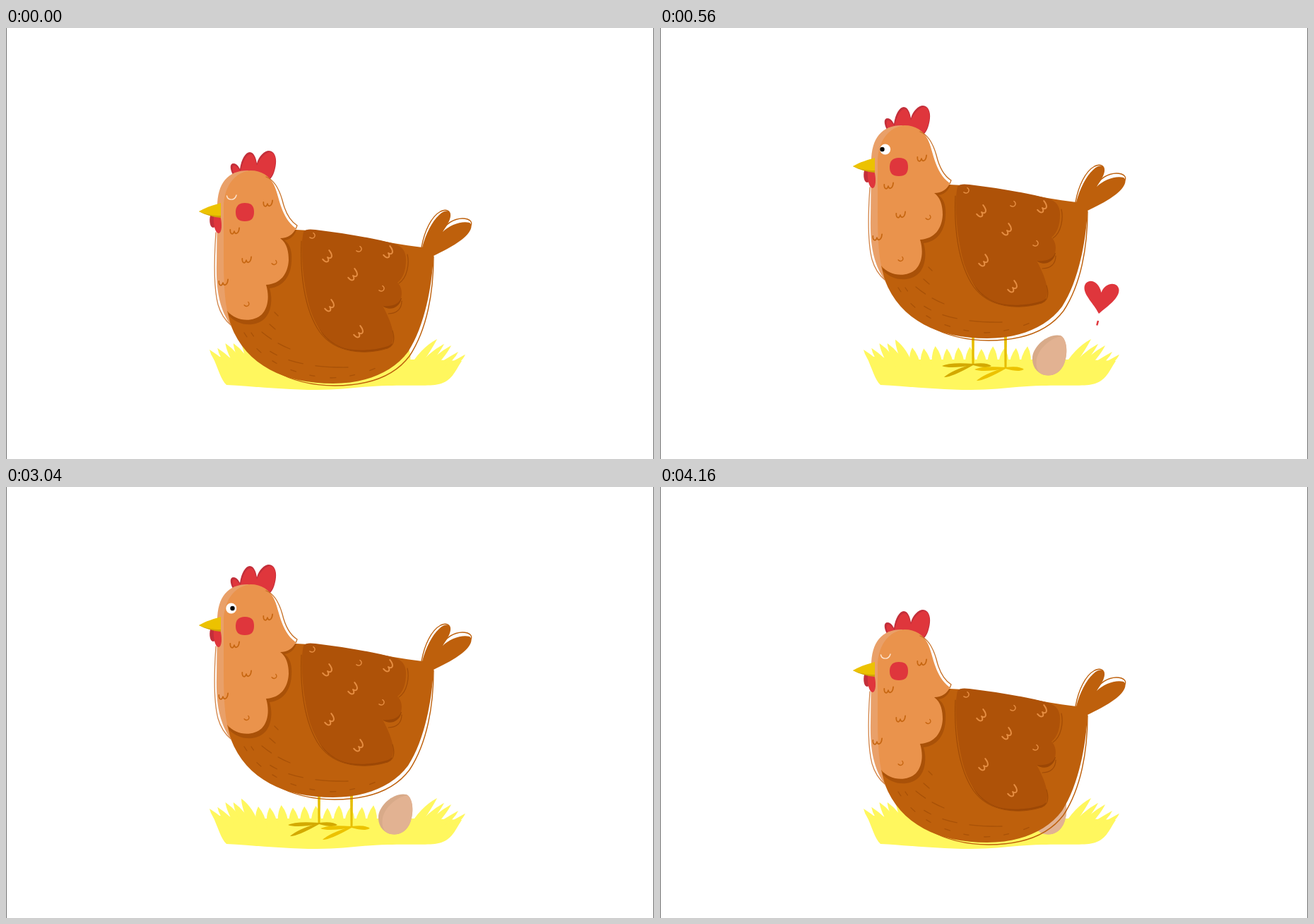
These frames come from a looping animation (917x611 px, 4320 ms). An HTML page:

```html
<!DOCTYPE html>
<html lang="en">
<head>
<meta charset="utf-8">
<title>Hen and egg</title>
<style>
html, body { margin: 0; width: 100%; height: 100%; overflow: hidden; background: #fff; }
svg { display: block; width: 100%; height: 100%; }
.line { fill: none; stroke-linecap: round; stroke-linejoin: round; }
</style>
</head>
<body>
<svg viewBox="0 0 917 611">
  <path d="M.5 0V611M916.5 0V611" stroke="#707070"/>
  <g id="grass" fill="#fff75e">
    <path d="M292 465C300 482 304 499 312 506C350 508 395 513 440 513C480 513 500 508 540 507C575 506 600 508 612 505C631 501 635 487 645 472L600 470H345Z"/>
  </g>
  <g id="feet"></g>

  <g id="egg">
    <path fill="#d8aa89" d="M567 436C576 441 578 462 571 478C565 490 555 494 544 492C532 489 526 478 527 466C529 450 550 432 567 436Z"/>
    <path fill="#e2b292" d="M568 437C576 442 578 462 571 478C565 490 555 494 544 492C535 490 531 482 533 469C536 455 551 440 568 437Z"/>
  </g>

  <g id="hen">
    <path fill="#be600c" d="M380 222H410C480 225 530 240 589 247C594 228 603 210 613 201C620 194 628 194 629 200C630 207 624 216 618 225C628 215 645 209 656 212C662 216 657 227 645 236C632 246 617 253 605 259C603 300 593 358 569 395C546 426 506 440 463 440C395 440 340 415 318 357L304 325Z"/>
    <g class="line" stroke="#be600c" stroke-width="1.4">
      <path d="M588 247C592 224 602 203 615 196C621 193 627 194 628 199M622 217C630 208 643 204 653 207C658 209 660 212 658 216"/>
      <path d="M605 260C605 310 596 363 571 401C547 433 507 443 465 443C432 443 403 435 380 422"/>
    </g>
    <g class="line" stroke="#a85107" stroke-width="1.3">
      <path stroke-dasharray="7 22 8 20" d="M337 368C360 405 400 428 460 432Q500 430 530 415"/>
      <path stroke-dasharray="6 32 11 18 21 18 50" d="M347 368C367 400 410 418 484 417"/>
      <path stroke-dasharray="17 11 21" d="M362 367Q380 382 402 391"/>
      <path d="M373 356l8 7M380 339l5 5"/>
    </g>

    <path fill="#9c4705" d="M420 250C419 290 428 340 448 370C468 396 508 400 540 390C546 388 547 384 545 380ZM533 330C541 337 556 335 560 319L548 316Z"/>
    <path fill="#ae5208" d="M421 225C424 221 430 221 438 222C480 227 520 234 550 242C562 246 566 254 566 264C566 280 562 290 554 297C560 303 561 311 559 319C556 328 546 331 533 330C541 345 548 360 548 374C548 383 545 386 537 388C520 393 500 394 484 391C460 386 442 367 432 339C422 311 415 250 421 225Z"/>
    <path class="line" stroke="#a14b06" stroke-width="1.2" d="M418 238C416 280 421 334 444 367C466 397 507 400 540 390C550 386 550 375 547 365M541 341C552 341 560 335 560 323M556 298C568 290 571 270 568 257"/>
    <g id="wingMarks" class="line" stroke="#e58d42" stroke-width="1.7"></g>

    <path fill="#a95108" d="M411 222C408 231 402 236 394 237C403 243 405 255 404 267C403 288 392 303 373 305C378 321 375 339 366 348C351 362 326 357 315 343L330 300L380 230Z"/>
    <path fill="#c32f3a" d="M321 144C317 136 316 128 322 128C327 128 330 134 331 136C333 122 339 112 345 112C351 112 354 121 355 128C358 117 366 110 372 110C380 110 383 120 382 128C381 138 378 146 374 150L340 155Z"/>
    <path fill="#df363c" d="M323 144C320 137 320 131 323 131C327 132 329 136 332 139C335 125 340 115 346 115C351 115 353 123 355 131C359 120 368 112 374 112C381 113 382 121 381 129C380 138 377 145 373 149L340 155Z"/>
    <path fill="#e9a069" d="M299 190C299 156 314 138 342 138L355 142L313 337L318 357C303 336 297 310 298 270Z"/>
    <path fill="#ea934c" d="M346 138C362 138 373 146 379 158C387 174 388 204 410 220C407 228 399 234 388 234C398 241 400 254 400 265C399 285 388 299 368 300C373 316 371 333 362 342C349 354 325 352 313 337C308 312 308 280 308 250V190C308 162 323 140 346 138Z"/>
    <g class="line" stroke-width="1.3">
      <path stroke="#d28448" d="M297 226C294 270 294 305 300 328C304 342 311 351 318 357"/>
      <path stroke="#c66f24" d="M368 147C381 152 387 166 391 180C395 197 401 209 412 216L410 221"/>
    </g>
    <g id="headMarks" class="line" stroke="#c66611" stroke-width="1.7"></g>

    <path fill="#c32f3a" d="M289 202C287 210 289 219 293 219C297 219 298 211 298 202Z"/>
    <path fill="#df363c" d="M294 202C293 215 296 227 301 227C306 226 306 212 303 202Z"/>
    <path fill="#d0a604" d="M273 196L304 193V205C293 204 282 201 273 196Z"/>
    <path fill="#ecc200" d="M273 196C283 190 294 187 304 184V202C293 202 282 200 273 196Z"/>
    <path fill="#df363c" d="M338 184C348 184 351 189 351 197C351 206 347 210 338 210C329 210 325 206 325 197C325 189 329 184 338 184Z"/>
    <path id="lid" class="line" stroke="#fde6d2" stroke-width="1.4" d="M312.5 174C314 181 324 181 326 173"/>
    <g id="eye">
      <circle cx="318.7" cy="172" r="7.5" fill="#fff"/>
      <circle id="pupil" cy="172" r="3.2"/>
    </g>
  </g>

  <g id="heart">
    <path fill="#df363c" d="M621 405C614 391 600 379 600.5 368C601 355 620 354 624.5 375C630 360 648 359 649.5 371C650 383 634 394 621 405Z"/>
    <path stroke="#df363c" stroke-width="2.5" d="M620 415L618.3 421.5"/>
  </g>
</svg>
<script>
const $ = id => document.getElementById(id);
const add = (id, d, attrs = '') =>
  $(id).insertAdjacentHTML('beforeend', `<path d="${d}" ${attrs}/>`);

// A row of blades between two end blades, each leaning from its root to its tip
function blades(count, from, to) {
  for (let i = 0; i < count; i++) {
    const mix = key => from[key] + (to[key] - from[key]) * i / (count - 1);
    const x = mix('x'), y = mix('y') + 2 * Math.sin(i * 2.4), root = mix('root');
    const mx = x + (root - x) * .45, my = y + 13;
    add('grass', `M${root - 7} 484Q${mx - 9} ${my} ${x} ${y}Q${mx + 9} ${my} ${root + 7} 484Z`);
  }
}
blades(5, { x: 288, y: 456, root: 314 }, { x: 333, y: 442, root: 353 });
blades(14, { x: 357, y: 453, root: 362 }, { x: 569, y: 453, root: 563 });
blades(5, { x: 610, y: 441, root: 576 }, { x: 650, y: 463, root: 618 });

// A leg with three toes that widen towards the tip
function foot(x, y, color) {
  add('feet', `M${x - 2} 430H${x + 2}L${x + 1.5} ${y + 1}H${x - 1.5}Z`, 'fill="#e6bd02"');
  for (const [dx, dy] of [[-44, 2], [-41, 18], [26, 2]]) {
    const cx = x + dx * .75, cy = y + dy * .75;
    add('feet', `M${x} ${y - 1}Q${cx} ${cy - 5} ${x + dx} ${y + dy}Q${cx} ${cy + 5} ${x} ${y + 1}Z`, `fill="${color}"`);
  }
}
foot(443, 477, '#d3a900');
foot(489, 482, '#ecc200');

// Feather marks: one shape repeated at a few points
const double = 'M-6-1C-5 6 0 6 0 0C2 5 7 3 6-6';
const single = 'M-4 3C3 6 6-3 0-5';
const marks = (id, d, angle, size, points) => points.forEach(([x, y]) =>
  add(id, d, `transform="translate(${x} ${y}) rotate(${angle}) scale(${size})"`));
marks('headMarks', double, 12, 1, [[370, 185], [323, 224], [340, 265], [307, 297]]);
marks('headMarks', single, 25, .8, [[380, 269], [341, 328]]);
marks('wingMarks', double, -32, 1.2, [[455, 261], [541, 255], [491, 287], [458, 331], [499, 368]]);
marks('wingMarks', single, 12, .9, [[500, 250], [532, 306], [434, 231]]);

const ramp = (t, from, to) => Math.min(1, Math.max(0, (t - from) / (to - from)));
const ease = p => (1 - Math.cos(Math.PI * p)) / 2;
const scaleAt = (x, y, sx, sy) =>
  `translate(${x} ${y}) scale(${sx} ${sy}) translate(${-x} ${-y})`;
const show = (id, on) => $(id).setAttribute('visibility', on ? 'visible' : 'hidden');
const move = (id, value) => $(id).setAttribute('transform', value);

function draw(now) {
  const t = Math.floor(now % 4320 / 40) * 40;

  const stand = ease(ramp(t, 0, 176)) - ease(ramp(t, 3780, 3980));
  move('hen', `translate(0 ${64 * (1 - stand)})`);

  const open = ramp(t, 200, 320) - ramp(t, 4000, 4120);
  show('lid', open === 0);
  show('eye', open > 0);
  move('eye', scaleAt(318.7, 174, 1, open));
  $('pupil').setAttribute('cx', 314.5 + 8 * (ramp(t, 1240, 1720) - ramp(t, 3000, 3160)));

  // The egg slides out from behind the belly
  const hidden = 1 - ease(ramp(t, 200, 400));
  show('egg', t > 200);
  move('egg', `translate(${-40 * hidden} ${-75 * hidden})`);

  const love = ease(ramp(t, 320, 520)) - ease(ramp(t, 560, 840));
  show('heart', love > 0);
  move('heart', scaleAt(620, 410, love, love));
}

const start = performance.now();
function loop() {
  draw(performance.now() - start);
  requestAnimationFrame(loop);
}
loop();
</script>
</body>
</html>
```
